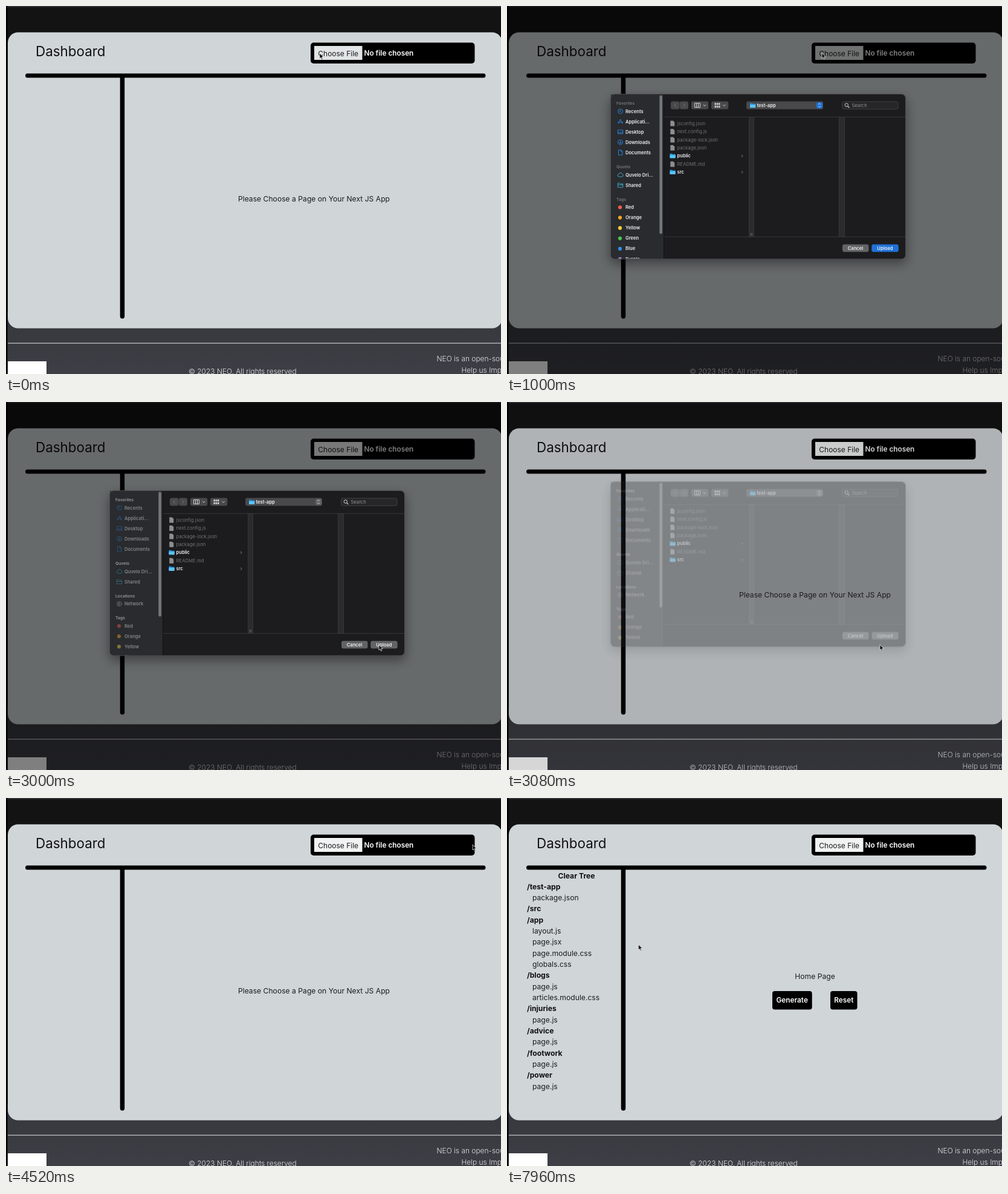
Write an HTML page that moves like this. It is 819x608 px and loops after 8 s.

```html
<!DOCTYPE html>
<html lang="en">
<head>
<meta charset="utf-8">
<title>Dashboard</title>
<style>
html, body { margin: 0; width: 100%; height: 100%; overflow: hidden; background: #131313; }
svg { display: block; width: 819px; height: 608px; }
text { font: 400 12.15px Inter, "Open Sans", sans-serif; dominant-baseline: central; fill: #1b1d20; white-space: pre; }
.mid { text-anchor: middle; }
.title { font-size: 22.4px; fill: #111; }
.bold { font-weight: 700; fill: #111; }
.btn { font-size: 11.8px; font-weight: 600; fill: #fff; }
.foot { font-size: 11.95px; font-weight: 300; fill: #e4e4e6; }

.panel text { font-size: 7.6px; font-weight: 600; fill: #f0f0f1; }
.panel .head { font-size: 6.8px; fill: #77797c; animation: head 8s infinite step-end; }
.panel .file { font-size: 7.75px; font-weight: 400; fill: #727375; }
.panel .hint { font-weight: 400; fill: #929294; }
.icon { fill: none; stroke: #2b8df0; stroke-width: .9; }
.cyan { stroke: #45b6d8; }
.chev { fill: none; stroke: #d0d0d2; stroke-width: 1; }

.prompt text { font-size: 7.85px; font-weight: 500; fill: #a2a4a8; }
.prompt .ask { font-size: 8.95px; font-weight: 600; fill: #f1f1f2; }
.prompt .act { font-size: 7.6px; font-weight: 600; fill: #8ab4f8; }

/* 1% = 80 ms */
#dim { animation: dim 8s infinite linear; }
#panel { animation: panel 8s infinite linear; }
#prompt { animation: prompt 8s infinite linear; }
#pointer { animation: pointer 8s infinite ease-in-out; }
#choose { animation: choose 8s infinite step-end; }
#tree { animation: tree 8s infinite step-end; }
#empty { animation: empty 8s infinite step-end; }
#home { animation: home 8s infinite step-end; }
#places { animation: places 8s infinite step-end; }
#tags { animation: tags 8s infinite step-end; }
#thumb { animation: thumb 8s infinite step-end; }
#side { animation: side 8s infinite step-end; }
.accent { animation: accent 8s infinite step-end; }

@keyframes dim {
  0%, 9.5% { opacity: 0; }
  11.5%, 37.6% { opacity: .5; }
  38.95%, 100% { opacity: 0; }
}
@keyframes panel {
  0%, 9.5% { opacity: 0; transform: translateY(-22px); animation-timing-function: ease-out; }
  11.5% { opacity: 1; transform: translateY(-2px); }
  12.5% { opacity: 1; transform: translateY(-1px); }
  13.5%, 37.6% { opacity: 1; transform: none; }
  38.95%, 100% { opacity: 0; transform: translateY(-22px); }
}
@keyframes prompt {
  0%, 41% { opacity: 0; }
  42.5%, 52% { opacity: 1; }
  53%, 100% { opacity: 0; }
}
@keyframes pointer {
  0%, 6.4% { transform: translate(519px, 78px); }
  7.5%, 14.5% { transform: translate(521px, 77.5px); }
  19.5% { transform: translate(494px, 160px); }
  20.5%, 24% { transform: translate(503px, 161px); }
  31% { transform: translate(636px, 393px); }
  34.5%, 40% { transform: translate(617px, 401px); }
  45% { transform: translate(561.5px, 281px); }
  49%, 52% { transform: translate(521px, 68px); animation-timing-function: ease-in; }
  55.5% { transform: translate(727px, 68px); animation-timing-function: ease-out; }
  56.5%, 74% { transform: translate(772px, 77px); animation-timing-function: linear; }
  74.5% { transform: translate(814.5px, 114px); animation-timing-function: ease-out; }
  84.5% { transform: translate(108px, 199px); }
  87.5%, 96% { transform: translate(46px, 201px); animation-timing-function: ease-out; }
  99.5%, 100% { transform: translate(217.5px, 242px); }
}
@keyframes choose { 0% { fill: #e2e5e5; } 14.5%, 100% { fill: #f1f2f2; } }
@keyframes tree { 0% { opacity: 0; } 68.5%, 100% { opacity: 1; } }
@keyframes empty { 0% { opacity: 1; } 90.5%, 100% { opacity: 0; } }
@keyframes home { 0% { opacity: 0; } 90.5%, 100% { opacity: 1; } }
@keyframes places { 0% { opacity: 0; } 25%, 100% { opacity: 1; } }
@keyframes tags { 0% { transform: none; } 25%, 100% { transform: translateY(36.5px); } }
@keyframes thumb { 0% { height: 229px; } 25%, 100% { height: 206px; } }
@keyframes side { 0% { opacity: 1; } 36%, 100% { opacity: .45; } }
@keyframes head { 0% { fill: #77797c; } 36%, 100% { fill: #98999b; } }
@keyframes accent { 0% { fill: #1f72d8; } 36%, 100% { fill: #626365; } }
</style>
</head>
<body>
<svg viewBox="0 0 819 608">
  <defs>
    <linearGradient id="floor" x2="0" y2="1">
      <stop stop-color="#36373c"/><stop offset="1" stop-color="#3e3f46"/>
    </linearGradient>
    <clipPath id="sideClip"><path d="M172 147H260V418.5H179Q172 418.5 172 411Z"/></clipPath>
    <filter id="soft" x="-20%" y="-20%" width="140%" height="150%"><feGaussianBlur stdDeviation="9"/></filter>
    <g id="folder">
      <path d="M0 1.2Q0 .4.8.4H3.4L4.4 1.4H8.3Q9.2 1.4 9.2 2.2V7.2Q9.2 8 8.4 8H.8Q0 8 0 7.2Z" fill="#2794dc"/>
      <path d="M0 3H9.2V7.2Q9.2 8 8.4 8H.8Q0 8 0 7.2Z" fill="#5cc3f5"/>
    </g>
    <path id="doc" d="M0 0H4.6L7 2.4V9H0Z" fill="#8d8e90"/>
  </defs>

  <rect width="819" height="608" fill="#131313"/>
  <rect width="819" height="1.6" fill="#3b3c40"/>
  <rect y="505" width="819" height="103" fill="url(#floor)"/>
  <rect x="3" y="43.5" width="818" height="489" rx="17" fill="#d0d5d8"/>
  <rect x="3" y="556.5" width="816" height="1.2" fill="#c9cacc"/>
  <rect x="3" y="587" width="64" height="64" fill="#fff"/>
  <text class="foot" x="302" y="603">© 2023 NEO. All rights reserved</text>
  <text class="foot" x="712.5" y="582.5">NEO is an open-source project</text>
  <text class="foot" x="753.5" y="601">Help us Improve</text>
  <rect width="2.5" height="608"/>

  <text class="title" x="49" y="74.3">Dashboard</text>
  <rect x="504" y="60.5" width="271.5" height="34.5" rx="5"/>
  <rect id="choose" x="510" y="66" width="79.5" height="23"/>
  <text class="mid" x="549.7" y="78" style="font-size:12px">Choose File</text>
  <text class="btn" x="592.5" y="77.5">No file chosen</text>
  <rect x="32" y="111.5" width="761.5" height="7" rx="3.5"/>
  <rect x="188.7" y="113" width="7.5" height="403.5" rx="3.7"/>

  <g id="tree"></g>
  <text id="empty" class="mid" x="509.5" y="318">Please Choose a Page on Your Next JS App</text>
  <g id="home">
    <text class="mid" x="509.5" y="294.7">Home Page</text>
    <rect x="439" y="319" width="65.7" height="30.5" rx="4"/>
    <text class="btn mid" x="471.7" y="334.3">Generate</text>
    <rect x="535" y="319" width="44.5" height="30.5" rx="4"/>
    <text class="btn mid" x="557.3" y="334.3">Reset</text>
  </g>

  <rect id="dim" width="819" height="608"/>

  <g id="panel" class="panel">
    <rect x="170" y="153" width="491" height="274" rx="9" opacity=".4" filter="url(#soft)"/>
    <rect x="171.5" y="146.5" width="488" height="272.5" rx="7" fill="#1c1c1e"/>
    <g clip-path="url(#sideClip)">
      <rect x="172" y="147" width="87.5" height="272" fill="#292b2e"/>
      <g id="heads"></g>
      <g id="side">
        <g id="items"></g>
        <g class="icon">
          <circle cx="187.5" cy="175" r="3.9"/><path d="M187.5 172.5V175.2H185.5"/>
          <path d="M187.5 188L184 195.5M187.5 188L191 195.5M183 193H192"/>
          <path d="M183.4 205.8H191.6V212H183.4ZM183.4 210H191.6"/>
          <circle cx="187.5" cy="226" r="3.9"/><path d="M187.5 223.5V228M185.7 226.3L187.5 228.2 189.3 226.3"/>
          <path d="M184.5 238.8H188.5L190.8 241V247.2H184.5ZM188.3 239V241.3H190.7"/>
          <path class="cyan" d="M185 283Q182.8 282.6 183 280.6 183.4 279 185 279 185.5 276.3 188 276.3 190 276.5 190.4 278.6 192.3 279 192.2 281 192 283 190.2 283Z"/>
          <path class="cyan" d="M183.3 293.6H186.3L187.3 294.8H191.7V300.6H183.3ZM183.3 296.5H191.7"/>
        </g>
      </g>
      <g id="places">
        <text class="head" x="181" y="320.2">Locations</text>
        <g opacity=".45">
          <circle cx="187.5" cy="333.5" r="3.9" fill="none" stroke="#bbb" stroke-width=".9"/>
          <path d="M183.6 333.5H191.4M187.5 329.6V337.4M185 331Q190 333.5 185 336.5" fill="none" stroke="#bbb" stroke-width=".7"/>
          <text x="196" y="333.5">Network</text>
        </g>
      </g>
      <g id="tags"><text class="head" x="181" y="320">Tags</text></g>
      <rect id="thumb" x="252.3" y="148.5" width="4.6" height="229" rx="2.3" fill="#757678"/>
    </g>
    <path d="M259.5 147V419" stroke="#111"/>
    <path d="M260 184.3H659M260 382.3H659" stroke="#39393b"/>

    <g fill="#49494b">
      <rect x="271" y="158.5" width="14.5" height="13" rx="3"/>
      <rect x="286" y="158.5" width="14" height="13" rx="3"/>
      <rect x="305" y="158.5" width="28.3" height="13" rx="3"/>
      <rect x="338" y="158.5" width="28.3" height="13" rx="3"/>
      <rect x="396" y="158.5" width="127" height="13" rx="3"/>
    </g>
    <g class="chev">
      <path d="M279.5 162.5L277 165 279.5 167.5M292 162.5L294.5 165 292 167.5" stroke="#77787a"/>
      <path d="M310.5 161.5H319.5V168.5H310.5ZM313.5 161.5V168.5M316.5 161.5V168.5"/>
      <path d="M324.8 164L327 166.2 329.2 164M357.3 164L359.5 166.2 361.7 164"/>
      <path d="M343.5 162.8H352.5M343.5 167.2H352.5" stroke-width="3" stroke-dasharray="2.5 .75"/>
    </g>
    <use href="#folder" x="402" y="161"/>
    <text x="413.5" y="165.2">test-app</text>
    <rect class="accent" x="512" y="160" width="10" height="10.2" rx="2.4"/>
    <path class="chev" d="M515 163.8L517 161.9 519 163.8M515 166.4L517 168.3 519 166.4"/>
    <rect x="554.5" y="159" width="92.5" height="12.3" rx="3" fill="#262628" stroke="#47474a" stroke-width=".9"/>
    <circle cx="561.8" cy="164.5" r="2.7" fill="none" stroke="#d8d8da"/>
    <path d="M563.8 166.6L566.3 169" stroke="#d8d8da" stroke-width="1.2"/>
    <text class="hint" x="570.5" y="165.2">Search</text>

    <g fill="#2b2b2d" stroke="#3b3b3d" stroke-width=".8">
      <rect x="400.5" y="184.5" width="8" height="197.5"/>
      <rect x="549.5" y="184.5" width="9" height="197.5"/>
    </g>
    <path d="M403.3 376V380.5M405.5 376V380.5" stroke="#77787a" stroke-width=".8"/>
    <g id="files"></g>

    <rect x="555" y="394.8" width="43.5" height="12.4" rx="3" fill="#626365"/>
    <text class="mid" x="576.5" y="401">Cancel</text>
    <rect class="accent" x="603.3" y="394.8" width="44.4" height="12.4" rx="3"/>
    <text class="mid" x="625.4" y="401">Upload</text>
    <rect x="171.5" y="146.5" width="488" height="272.5" rx="7" fill="none" stroke="#505154" stroke-width=".9"/>
  </g>

  <g id="prompt" class="prompt">
    <rect x="280" y="-10" width="271" height="104" rx="5" opacity=".35" filter="url(#soft)"/>
    <rect x="278.5" y="-10" width="274" height="101.3" rx="4" fill="#292a2d"/>
    <text class="ask" x="288.5" y="16">Upload 49 files to this site?</text>
    <text x="288.5" y="34">This will upload all files from "test-app". Only do this if you trust</text>
    <text x="288.5" y="46.2">the site.</text>
    <rect x="447.5" y="61.5" width="44.5" height="19.5" rx="2.5" fill="none" stroke="#3d4045"/>
    <text class="act mid" x="469.7" y="71.3">Cancel</text>
    <rect x="497" y="61" width="46" height="20.3" rx="2.5" fill="#8ab4f8"/>
    <text class="act mid" x="519.8" y="71.3" style="fill:#33486e">Upload</text>
  </g>

  <path id="pointer" d="M0 0V9L2 7.2 3.4 10.4 4.9 9.8 3.5 6.6H6.3Z" fill="#0b0b0b" stroke="#f4f4f4" stroke-width=".7"/>
</svg>
<script>
const NS = "http://www.w3.org/2000/svg";
const el = id => document.getElementById(id);

function add(parent, tag, attrs, text = "") {
  const node = document.createElementNS(NS, tag);
  for (const key in attrs) node.setAttribute(key, attrs[key]);
  node.textContent = text;
  return parent.appendChild(node);
}

const label = (parent, x, y, text, cls = "") => add(parent, "text", { x, y, class: cls }, text);

// Folder names start with a slash; files are indented.
label(el("tree"), 115, 128, "Clear Tree", "bold mid");
`/test-app package.json /src /app layout.js page.jsx page.module.css globals.css
/blogs page.js articles.module.css /injuries page.js /advice page.js
/footwork page.js /power page.js`.split(/\s+/).forEach((name, i) => {
  const dir = name[0] === "/";
  label(el("tree"), dir ? 33 : 42, 146.3 + i * 18.33, name, dir ? "bold" : "");
});

label(el("heads"), 181, 161, "Favorites", "head");
label(el("heads"), 181, 266.2, "Quvelo", "head");
["Recents", "Applicati…", "Desktop", "Downloads", "Documents"].forEach((name, i) =>
  label(el("items"), 196, 175 + i * 17.05, name));
["Quvelo Dri…", "Shared"].forEach((name, i) =>
  label(el("items"), 196, 280 + i * 17.05, name));

const tagList = add(el("tags"), "g", { style: "animation: side 8s infinite step-end" });
Object.entries({
  Red: "#f0604d", Orange: "#f5a623", Yellow: "#f3cf3a",
  Green: "#4cc552", Blue: "#2f8fe8", Purple: "#b98be0"
}).forEach(([name, fill], i) => {
  const y = 333.5 + i * 17.1;
  add(tagList, "circle", { cx: 187, cy: y, r: 3.1, fill });
  label(tagList, 196, y, name);
});

["jsconfig.json", "next.config.js", "package-lock.json", "package.json", "public", "README.md", "src"]
  .forEach((name, i) => {
    const y = 195 + i * 13.42, dir = !name.includes(".");
    add(el("files"), "use", { href: dir ? "#folder" : "#doc", x: dir ? 269.5 : 270.3, y: y - 4.4 });
    label(el("files"), 281.5, y, name, dir ? "" : "file");
    if (dir) add(el("files"), "path", { class: "chev", d: `M388 ${y - 2}l2 2-2 2`, opacity: .6 });
  });
</script>
</body>
</html>
```
